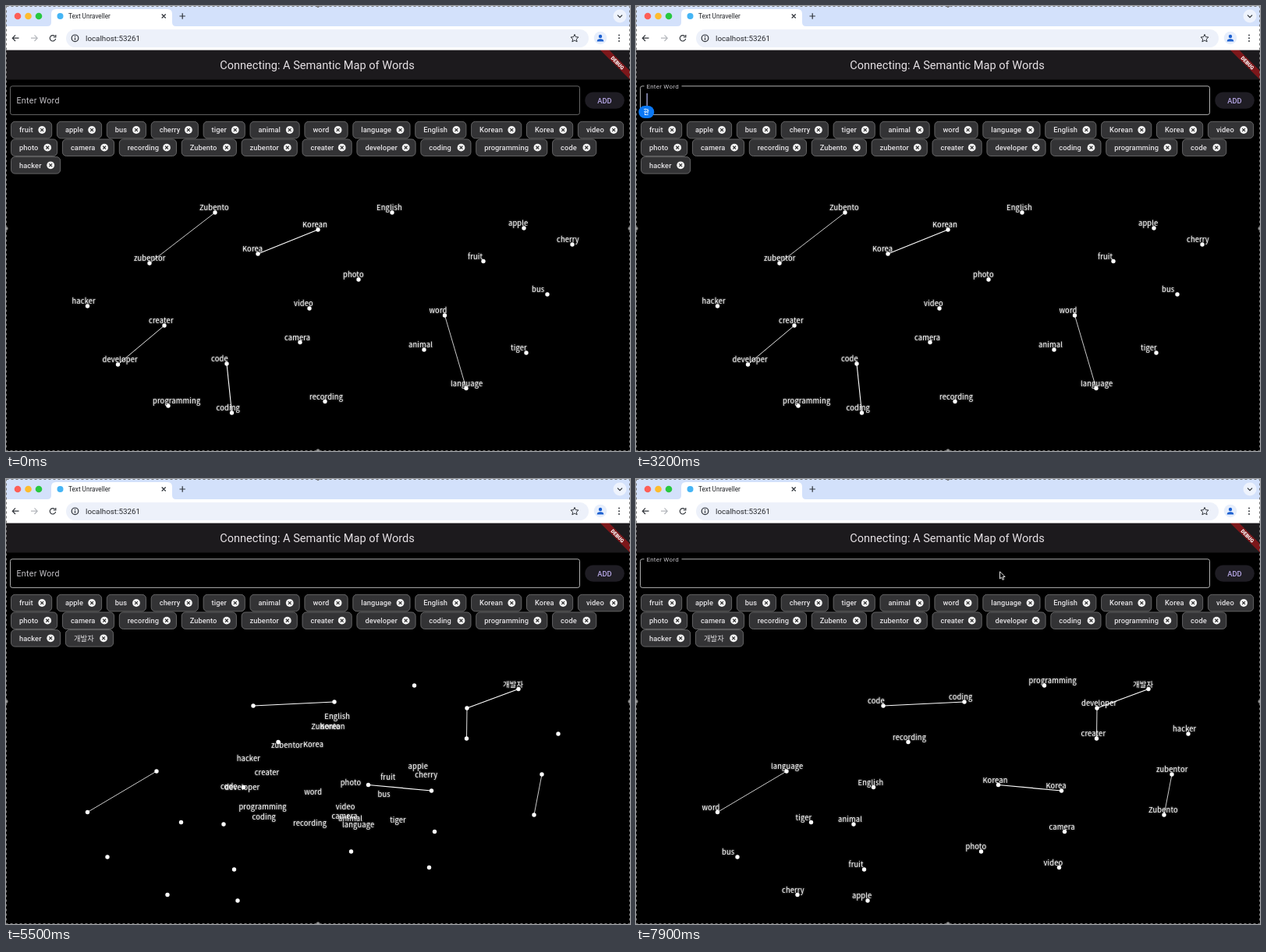
These frames come from a looping animation (800 by 571 pixels, 8000 ms). An HTML page:

```html
<!DOCTYPE html>
<html lang="en">
<head>
<meta charset="utf-8">
<style>
html, body { margin: 0; height: 100%; overflow: hidden; background: #000; }
svg { display: block; width: 100vw; height: 100vh; }
text { font-family: Roboto, "Noto Sans CJK KR", "Noto Sans CJK", sans-serif; }
.chip text, .btn { font-size: 9.3px; font-weight: 500; letter-spacing: .067px; }
.labels { filter: drop-shadow(0 0 1.3px rgba(255,255,255,.55)); }
.labels text { font: 9.31px "Noto Sans CJK KR", "Noto Sans CJK", sans-serif; letter-spacing: .17px; fill: #fff; }
.typed { font: 10.64px "Noto Sans CJK KR", "Noto Sans CJK", sans-serif; fill: #fff; }
.hint { font-size: 10.64px; letter-spacing: .33px; fill: #c6c4c9; }
.icon { fill: none; stroke: #30343a; stroke-width: 1.2; }
</style>
</head>
<body>
<svg viewBox="0 0 800 571" preserveAspectRatio="none">
  <!-- app -->
  <rect width="800" height="571"/>
  <rect y="56" width="800" height="38.5" fill="#1c1a1d"/>
  <text x="399" y="80.5" font-size="14.57" text-anchor="middle" fill="#e6e1e5">Connecting: A Semantic Map of Words</text>
  <g transform="translate(800 57) rotate(45)">
    <rect x="-27" y="18.6" width="54" height="8" fill="#7d171a"/>
    <text y="25" font-size="6.5" font-weight="900" text-anchor="middle" fill="#fff">DEBUG</text>
  </g>
  <rect x="742.3" y="110.5" width="50.5" height="21.3" rx="10.6" fill="#1f1d24"/>
  <text class="btn" x="767.4" y="124.5" text-anchor="middle" fill="#b9a9e8">ADD</text>
  <g id="scene"></g>

  <!-- browser window -->
  <rect width="800" height="56.6" fill="#fff"/>
  <rect width="800" height="26" fill="#d3e1fb"/>
  <path d="M53 26q5 0 5-5V10q0-6 6-6H207q6 0 6 6V21q0 5 5 5z" fill="#fff"/>
  <circle cx="15" cy="13" r="4.3" fill="#fe5f57"/>
  <circle cx="28.5" cy="13" r="4.3" fill="#febc2e"/>
  <circle cx="42" cy="13" r="4.3" fill="#28c840"/>
  <circle cx="69.5" cy="13" r="4" fill="#45b5f5"/>
  <text x="80" y="16" font-size="8.2" fill="#1f2125">Text Unraveller</text>
  <circle cx="787" cy="13" r="8.5" fill="#eef3fd"/>
  <rect x="77" y="30" width="670" height="23" rx="11.5" fill="#edf1fa"/>
  <g class="icon">
    <path d="M199.7 10.5l5 5m0-5l-5 5M222.5 13h7.4M226.2 9.3v7.4M784 11.7l3 3 3-3"/>
    <path d="M16.5 41.2H8.5M12 37.4L8.3 41.2 12 45"/>
    <path d="M32 41.2h8M36.5 37.4L40.2 41.2 36.5 45" stroke="#b4b7bc"/>
    <path d="M62.6 38.7A3.7 3.7 0 1 0 63.6 42M63.8 37v3h-3"/>
    <circle cx="88.5" cy="41.3" r="4.3"/>
    <path d="M88.5 40.7v3M88.5 38.6v1.1"/>
    <path stroke-width="1" d="M729 36.4l1.4 3.3 3.6.3-2.7 2.4.8 3.5-3.1-1.9-3.1 1.9.8-3.5-2.7-2.4 3.6-.3z"/>
  </g>
  <text x="102" y="44.6" font-size="9.8" fill="#26282c">localhost:53261</text>
  <circle cx="762" cy="41" r="8.3" fill="#e6eefc"/>
  <path d="M757.7 45.5q0-3.2 4.3-3.2t4.3 3.2z" fill="#1a5fd0"/>
  <circle cx="762" cy="39" r="2.2" fill="#1a5fd0"/>
  <path d="M786 37.4v.01M786 41.2v.01M786 45v.01" stroke="#30343a" stroke-width="1.9" stroke-linecap="round"/>

  <!-- selection frame -->
  <rect x=".5" y=".5" width="799" height="570" fill="none" stroke="#777" stroke-dasharray="3 3"/>
  <g fill="#999" stroke="#555" stroke-width=".8">
    <circle cy="285.5" r="2.4"/><circle cx="800" cy="285.5" r="2.4"/>
    <circle cx="400" r="1.6"/><circle cx="400" cy="571" r="2.4"/>
  </g>
</svg>
<script>
const LOOP = 8000, STEP = 100;
const ADDED = '개발자';
const HOVER = 800, CLICK = 1000, SUBMIT = 5000, CHIP = 5300, REMAP = 5400, CLICK2 = 7300;

// word, chip width, dot before (x y), dot after (x y)
const words = `fruit 53 612 327.5 292.5 501
apple 58 664 285 297 541
bus 51 694 370 130 485
cherry 61 726 306 207 533.5
tiger 54 667 445 224.5 440.5
animal 64 536 441 279 443
word 56 562.5 397 104.5 427.5
language 74 590 490.5 193 375
English 66 495 265 304.5 395.5
Korean 65 400 287 464.5 392.5
Korea 60 323 318 545.5 400
video 59 389 388 542.5 498.5
photo 60 452 351 442.5 478
camera 67 377 431.5 549.5 452.5
recording 74 409 507.5 349 337.5
Zubento 71 268 265 677 431
zubentor 72 184 330 687 379
creater 64 203 410 590.5 333
developer 76 143.5 460 591 294
coding 65 289.5 522 421 286
programming 92 208 513 523.5 265
code 57 283 459 317 291
hacker 64 104.5 385 708 327
${ADDED} 62 657 269.5 657 269.5`.split('\n').map(line => {
  const [name, ...n] = line.split(' ');
  const [w, x0, y0, x1, y1] = n.map(Number);
  return { name, w, before: [x0, y0], after: [x1, y1] };
});
const byName = Object.fromEntries(words.map(w => [w.name, w]));

const links = [['Zubento', 'zubentor', .8], ['Korean', 'Korea', 1.2], ['creater', 'developer', .9],
  ['code', 'coding', 1.1], ['word', 'language', .8], ['developer', ADDED, 1.2]];

const keys = [[3400, 'ㄱ'], [3500, '개'], [3700, '갭'], [3800, '개바'], [4000, '개발'],
  [4600, '개발ㅈ'], [4800, ADDED]];

const clamp = v => Math.max(0, Math.min(1, v));
const mix = (a, b, k) => a + (b - a) * k;
const smooth = k => k * k * (3 - 2 * k);

function chips(t) {
  let x = 6, y = 148, out = '';
  for (const { name, w } of words) {
    if (name === ADDED && t < CHIP) continue;
    if (x + w > 795) { x = 6; y += 22.65; }
    const c = x + w - 12.8, m = y + 11;
    out += `<rect x="${x + .5}" y="${y + .3}" width="${w - .8}" height="21.5" rx="5" fill="#333335" stroke="#6c6c6e" stroke-width=".9"/>
      <text x="${x + 11}" y="${m + 3.4}" fill="#e4e2e5">${name}</text>
      <circle cx="${c}" cy="${m}" r="4.9" fill="#f2f2f2"/>
      <path d="M${c - 1.9} ${m - 1.9}l3.8 3.8m0-3.8l-3.8 3.8" stroke="#2a2a2b" stroke-width="1.1"/>`;
    x += w + 5.9;
  }
  return `<g class="chip">${out}</g>`;
}

function graph(t) {
  const moved = t >= REMAP, k = clamp((t - 5325) / 500);
  const dot = w => moved ? w.after : w.before;
  const shown = words.filter(w => moved || w.name !== ADDED);
  const lines = links.filter(l => moved || l[1] !== ADDED).map(([a, b, width]) =>
    `<path d="M${dot(byName[a])}L${dot(byName[b])}" stroke="#fff" stroke-width="${width}"/>`);
  const dots = shown.map(w => `<circle cx="${dot(w)[0]}" cy="${dot(w)[1]}" r="2.7" fill="#fff"/>`);
  const labels = shown.map(({ name, before, after }) =>
    `<text x="${mix(before[0], after[0], k) - 20}" y="${mix(before[1], after[1], k) - 2.6}">${name}</text>`);
  return lines.join('') + dots.join('') + `<g class="labels">${labels.join('')}</g>`;
}

function field(t) {
  const focused = t >= CLICK && t < SUBMIT || t >= CLICK2;
  const lift = t >= CLICK2 ? clamp((t - CLICK2) / 170)
    : clamp((t - CLICK) / 170) - clamp((t - SUBMIT) / 170);
  const key = t < SUBMIT && keys.filter(k => k[0] <= t).pop();
  const typed = key ? key[1] : '';
  const blinkFrom = key ? key[0] : t >= CLICK2 ? CLICK2 : CLICK;
  const end = 13.5 + typed.length * 9.8;
  let out = `<rect x="5.5" y="102.8" width="730" height="36.6" rx="2.6" fill="none" stroke="${t < HOVER ? '#666' : '#b0b0b0'}"/>
    <rect x="10.5" y="101" width="${48 * lift}" height="4"/>
    <text class="hint" transform="translate(13.4 ${mix(124.6, 106, lift)}) scale(${mix(1, .75, lift)})">Enter Word</text>`;
  if (typed) out += `<text class="typed" x="13.5" y="125">${typed}</text>
    <path d="M${end - 9.5} 127.3H${end}" stroke="#3f7cf5" stroke-width="1.2"/>`;
  if (focused && Math.floor((t - blinkFrom) / 500) % 2 === 0)
    out += `<rect x="${end}" y="112" width="1.3" height="18" fill="#aeb2e6"/>`;
  if (t >= 2500 && t < 3400)
    out += `<rect x="3.3" y="128" width="20" height="16" rx="8" fill="#0a78f5"/>
      <text x="13.3" y="138.8" font-size="7.5" font-weight="700" text-anchor="middle" fill="#fff">한</text>`;
  return out;
}

// The pointer enters from below, hides for typing and reappears in place.
function pointer(t) {
  if (t < 100 || t >= 2900 && t < CLICK2) return '';
  const k = smooth(clamp((t - 100) / 800));
  return `<path transform="translate(${mix(482, 466.5, k)} ${mix(541, 118.8, k)})"
    d="M0 0V9.2L2.1 7.3 3.6 10.6 5.2 9.9 3.8 6.7H6.6z" fill="#000" stroke="#fff" stroke-width=".9"/>`;
}

const scene = document.getElementById('scene');
let last = -1;
function frame(now) {
  const t = Math.floor(now % LOOP / STEP) * STEP;
  if (t !== last) {
    scene.innerHTML = chips(t) + graph(t) + field(t) + pointer(t);
    last = t;
  }
  requestAnimationFrame(frame);
}
requestAnimationFrame(frame);
</script>
</body>
</html>
```
